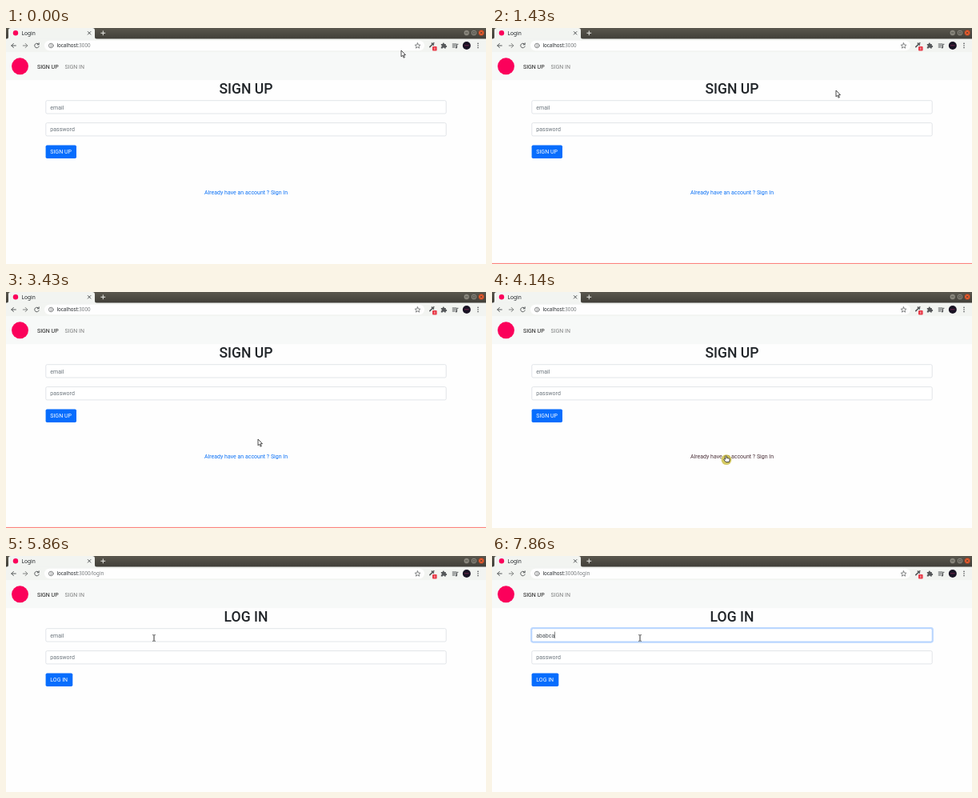
Animation of 600x295 px, one loop 8000 ms. Source, as an HTML page:

```html
<!DOCTYPE html>
<html lang="en">
<head>
<meta charset="utf-8">
<title>Login</title>
<style>
  html, body { margin: 0; width: 100%; height: 100%; overflow: hidden; background: #fefefe; }
  svg { display: block; width: 100vw; height: 100vh; }
  text { font: 7.03px Roboto, sans-serif; fill: #212529; white-space: pre; }
  .ui { font-family: "Noto Sans", sans-serif; }
  .icon { fill: none; stroke: #55585a; stroke-width: 1; stroke-linecap: round; stroke-linejoin: round; }
  .solid { fill: #55585a; }
  .field { fill: #fff; stroke: #ced4da; stroke-width: .6; }
  .hint { fill: #6c757d; }
  .pointer { fill: #fff; stroke: #222; stroke-width: .8; stroke-linejoin: round; }
</style>
</head>
<body>
<svg viewBox="0 0 600 295" preserveAspectRatio="none">
  <defs>
    <linearGradient id="bar" x2="0" y2="1">
      <stop stop-color="#5a574e"/><stop offset="1" stop-color="#403e38"/>
    </linearGradient>
  </defs>
  <rect width="600" height="295" fill="#fefefe"/>

  <!-- window and tab -->
  <rect width="600" height="14" fill="url(#bar)"/>
  <path d="M0 14Q3 14 3 11V3Q3 0 6 0H108Q111 0 111 3V11Q111 14 114 14Z" fill="#f2f4f1"/>
  <circle cx="12" cy="6.3" r="3.2" fill="#fb015b"/>
  <text class="ui" x="19.5" y="8.8" style="font-size:6.6px">Login</text>
  <path class="icon" d="M102.3 4.5l3.6 3.6m0-3.6l-3.6 3.6"/>
  <path class="icon" style="stroke:#e8e8e4" d="M118.8 6.3h5m-2.5-2.5v5"/>
  <g stroke="#35332e" stroke-width=".5">
    <circle cx="575.7" cy="6" r="3.7" fill="#8b887e"/>
    <circle cx="584.9" cy="6" r="3.7" fill="#8b887e"/>
    <circle cx="594.2" cy="6" r="3.7" fill="#ea5b2d"/>
  </g>
  <path d="M574 6h3.4M583.4 4.7h3v2.6h-3zM592.8 4.6l2.8 2.8m0-2.8l-2.8 2.8" fill="none" stroke="#3c3a34" stroke-width=".7"/>

  <!-- toolbar -->
  <rect y="13.5" width="600" height="17" fill="#f2f4f1"/>
  <rect x="48" y="15.8" width="475" height="12.4" rx="6.2" fill="#fefefe"/>
  <path class="icon" d="M12.3 22H6.8m2.6-2.6L6.8 22l2.6 2.6"/>
  <path class="icon" style="stroke:#808382" d="M21.3 22h5.5m-2.6-2.6l2.6 2.6-2.6 2.6"/>
  <path class="icon" d="M40.8 20.3A2.8 2.8 0 1 0 41.2 23M41.2 18.8v2h-2"/>
  <circle class="icon" cx="56.3" cy="22" r="2.8" style="stroke-width:.7"/>
  <path class="icon" style="stroke-width:.8" d="M56.3 21.9v1.5m0-3v.1"/>
  <text class="ui" x="63.5" y="24.3" style="font-size:6.2px">localhost<tspan id="path" fill="#74787b"></tspan></text>
  <path class="icon" style="stroke-width:.7" d="M514.5 18.8l1 2.2 2.3.2-1.8 1.6.6 2.4-2.1-1.3-2.1 1.3.6-2.4-1.8-1.6 2.3-.2z"/>
  <path class="icon" style="stroke-width:1.6" d="M529.8 23.6l3.4-3.4m-.8-1.1l2 2m-.6-1.4l1-1"/>
  <rect x="533" y="23" width="5.6" height="5.6" rx="1" fill="#e83a48"/>
  <path d="M535.8 24.4v2.8" stroke="#fff" stroke-width=".6"/>
  <path class="solid" d="M543.8 19.9h2v-.5a1 1 0 0 1 2 0v.5h2v2h.4a1 1 0 0 1 0 2h-.4v1.7h-1.8a1.1 1.1 0 0 0-2.2 0h-2v-2a1.1 1.1 0 0 0 0-2.2z"/>
  <path class="icon" d="M558.2 20h4.6m-4.6 2h4.6m-4.6 2h2.6M563.6 24.3v-4h1.4"/>
  <circle class="solid" cx="562.8" cy="24.4" r="1.1"/>
  <circle cx="575.8" cy="22" r="5" fill="#191324"/>
  <rect x="572.8" y="21" width="6" height="1.6" rx=".8" fill="#55203f"/>
  <g class="solid"><circle cx="590" cy="19.4" r=".8"/><circle cx="590" cy="22" r=".8"/><circle cx="590" cy="24.6" r=".8"/></g>

  <!-- page -->
  <rect y="30.3" width="600" height="34.9" fill="#f7f9f8"/>
  <circle cx="17.5" cy="47.8" r="10.5" fill="#fb015b"/>
  <text x="39" y="50.6" style="fill:#1a1a1a">SIGN UP</text>
  <text x="73.5" y="50.6" style="fill:#7f8080">SIGN IN</text>
  <text id="head" x="300" y="82.4" text-anchor="middle" style="font-size:17.57px;font-weight:500"></text>
  <rect id="ring" x="48.9" y="89.8" width="502.2" height="18.1" rx="2.3" fill="none" stroke="#0d6efd" stroke-width="1.5"/>
  <rect id="email" class="field" x="49.8" y="90.7" width="500.4" height="16.3" rx="1.7"/>
  <text id="entry" x="55.3" y="101.5"></text>
  <path id="caret" stroke="#333" stroke-width=".6"/>
  <rect class="field" x="49.8" y="118.6" width="500.4" height="16.3" rx="1.7"/>
  <text class="hint" x="55.3" y="129.4">password</text>
  <rect id="btn" x="49.6" y="146.4" height="16.7" rx="1.8" fill="#076dfd"/>
  <text id="btnText" x="55.3" y="157.3" style="fill:#fff"></text>
  <text id="link" x="300" y="207.5" text-anchor="middle">Already have an account ? Sign In</text>
  <path id="line" d="M0 294.4H600" stroke="#fb7770" stroke-width="1"/>

  <!-- pointer -->
  <circle id="click" r="6.4" fill="#c9bb3c" opacity=".8"/>
  <g id="pointer">
    <path id="arrow" class="pointer" d="M0 0V7.8L1.8 6.2L3.1 9.2L4.4 8.6L3.1 5.7H5.5Z"/>
    <path id="hand" class="pointer" d="M-1.2 4.2V.4Q-.4-.8.4.4V2.4L3.6 3.1Q4.4 3.5 4.1 5L3.4 7.6H-.6L-3.2 4.6Q-3.2 3.4-2 3.8Z"/>
    <path id="beam" d="M-1.7-3.8H-.6L0-3.2L.6-3.8H1.7M0-3.2V3.2M-1.7 3.8H-.6L0 3.2L.6 3.8H1.7" fill="none" stroke="#333" stroke-width="1"/>
  </g>
</svg>
<script>
  const LOOP = 8000, TICK = 1000 / 7;
  const $ = id => document.getElementById(id);
  const set = (id, attrs) => { for (const k in attrs) $(id).setAttribute(k, attrs[k]); };
  const show = (id, on) => { $(id).style.display = on ? '' : 'none'; };
  const put = (id, text) => { if ($(id).textContent !== text) $(id).textContent = text; };

  // pointer path: tick, x, y
  const route = [
    [0, 494, 28], [3, 476, 44], [7, 430, 72], [10, 430, 78], [12, 375, 160],
    [14, 240, 241], [15, 120, 205], [16, 20, 120], [17, 12, 82], [18, 118, 60],
    [20, 391, 92], [22, 360, 165], [24, 315, 184], [27, 294, 203], [29, 293, 205],
    [32, 305.6, 194], [34, 331, 172], [36, 285, 135], [38, 205, 108], [40, 185, 102.5]
  ];
  // typed text: tick, value
  const typed = [[46, 'a'], [47, 'aba'], [52, 'abab'], [54, 'ababc'], [55, 'ababca']];

  function pointerAt(n) {
    const i = route.findIndex(p => p[0] > n);
    if (i < 0) return route[route.length - 1].slice(1);
    const [t0, x0, y0] = route[i - 1], [t1, x1, y1] = route[i];
    const f = (n - t0) / (t1 - t0);
    return [x0 + (x1 - x0) * f, y0 + (y1 - y0) * f];
  }

  function draw(ms) {
    const n = Math.floor((ms % LOOP + 4) / TICK) % 56;
    const login = n >= 30, focus = n >= 43;
    const [x, y] = pointerAt(n);

    put('path', login ? ':3000/login' : ':3000');
    put('head', login ? 'LOG IN' : 'SIGN UP');
    put('btnText', login ? 'LOG IN' : 'SIGN UP');
    set('btn', { width: login ? 33.7 : 38.4 });
    show('link', !login);
    const hover = n >= 27 && n < 30;
    $('link').style.fill = hover ? '#4a3038' : '#0a70f5';
    show('line', n >= 4 && n < 27);

    show('ring', focus);
    set('ring', { opacity: n === 43 ? .16 : .27 });
    $('email').style.stroke = focus ? '#86b7fe' : '#ced4da';
    const value = typed.reduce((v, [at, s]) => n >= at ? s : v, '');
    put('entry', value || 'email');
    $('entry').style.fill = value ? '#495057' : '#6c757d';
    const end = 55.5 + (value ? $('entry').getComputedTextLength() : 0);
    set('caret', { d: `M${end} 94.6V103` });
    show('caret', focus && n !== 51);

    const beam = n >= 39;
    show('arrow', !hover && !beam);
    show('hand', hover);
    show('beam', beam);
    set('pointer', { transform: `translate(${x} ${y})` });
    show('click', n === 29 || n === 42);
    set('click', { cx: x, cy: y + 4.6 });
  }

  const start = performance.now();
  function loop() {
    draw(performance.now() - start);
    requestAnimationFrame(loop);
  }
  loop();
</script>
</body>
</html>
```
